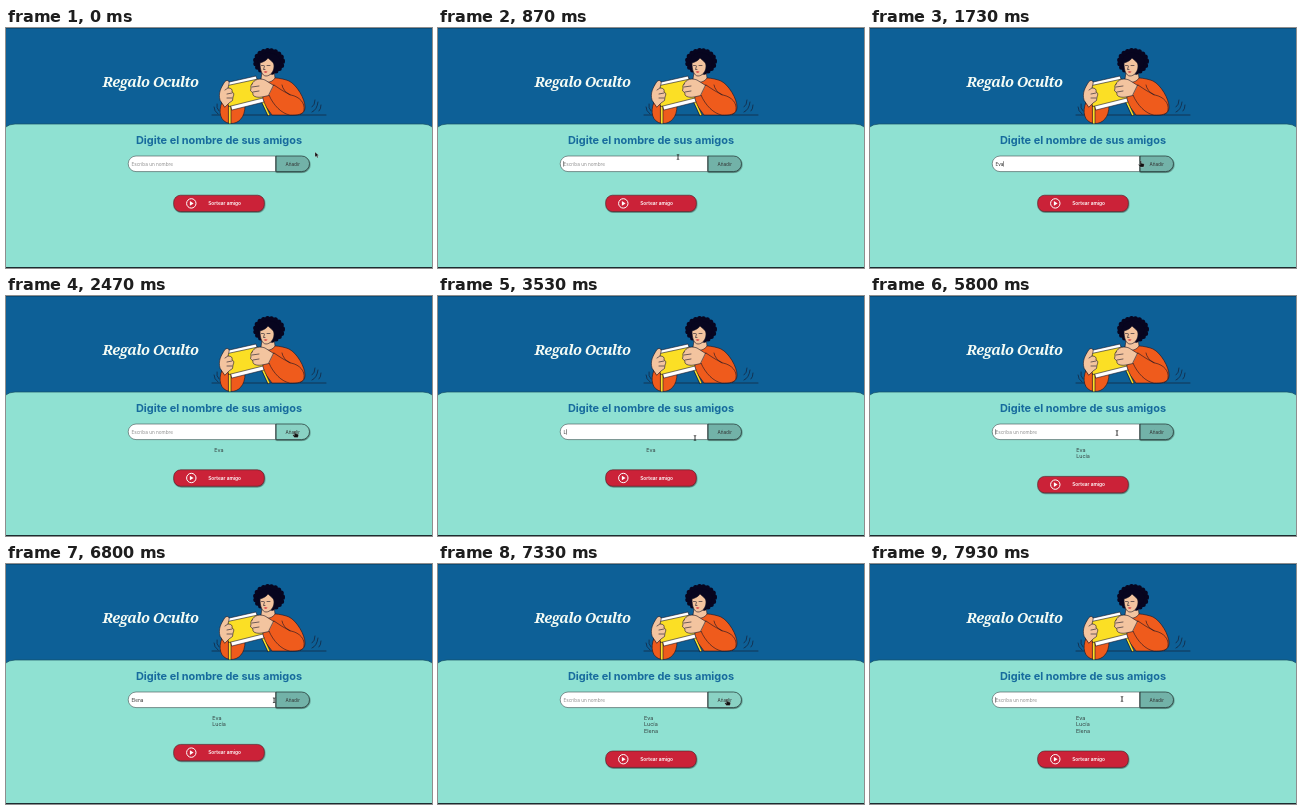
Recreate the animation shown at these times as an HTML page. Size 426 by 240 pixels, loop 8 s.

```html
<!DOCTYPE html>
<html lang="es">
<head>
<meta charset="utf-8">
<title>Regalo Oculto</title>
<style>
  html, body { margin: 0; width: 100%; height: 100%; overflow: hidden; background: #0d6097; }
  svg { display: block; width: 100vw; height: 100vh; }
  text { font-family: Inter, Roboto, sans-serif; }
  .title { font: italic 900 14.6px "Noto Serif", "Liberation Serif", serif; letter-spacing: -.6px; fill: #f4fbf4; }
  .heading { font-size: 10.95px; font-weight: 700; fill: #176b9d; }
  .field { font-size: 4.7px; fill: #333; }
  .list { font-size: 5.4px; fill: #333f3f; }
  .ink { stroke: #171525; stroke-width: .6; stroke-linejoin: round; stroke-linecap: round; }
  .line { fill: none; }
  .skin { fill: #f3c49f; }
  .orange { fill: #ef5b1c; }
  .yellow { fill: #fbdf25; }
</style>
</head>
<body>
<svg viewBox="0 0 426 240">
  <defs>
    <filter id="shadow" x="-10%" y="-20%" width="120%" height="160%">
      <feDropShadow dx=".5" dy="1" stdDeviation=".7" flood-opacity=".45"/>
    </filter>
  </defs>

  <rect width="426" height="240" fill="#0d6097"/>
  <rect width="426" height=".8" opacity=".25"/>
  <text class="title" x="144.5" y="59" text-anchor="middle">Regalo Oculto</text>

  <g class="ink">
    <path class="line" d="M206 87H320M208 79q0 4 4 7M211 76q-1 4 2 7M306 84q5-2 6-10M306 79q3-2 3-7M313 83q2-2 2-6"/>
    <path class="orange" d="M252 52C262 48 276 50 283 53C291 57 299 71 299 79C299 85 295 87 288 87H266L255 72Z"/>
    <path class="orange" d="M216 74C212 84 214 94 224 95.5C233 96 239 89 239 78Z"/>

    <path class="skin" d="M256 44L255 51C258 56 266 55 269 50L268 42Z"/>
    <g fill="#07051f" stroke="#07051f">
      <ellipse cx="263" cy="33.5" rx="13.5" ry="11" stroke="none"/>
      <ellipse cx="263" cy="33.5" rx="13.5" ry="11" fill="none" stroke-width="5" stroke-dasharray="0 4"/>
    </g>
    <path class="skin" d="M254 35C257 34 260 33 262 30C265 33 268 34 268 38C268 44 264 48 260 48C256 48 254 42 254 35Z"/>
    <path class="line" d="M255.5 37.5h2M261 37.5h3M258.5 38l-1 3.5h1.5"/>
    <path d="M257.6 43.8q2-1 4 0q-2 2-4 0" fill="#cf3039" stroke="none"/>

    <path class="yellow" d="M222.8 77h2.2V96h-2.2ZM254 70l1.8-.8L264 87l-1.8.7Z"/>
    <path fill="#fff" d="M219 55L250 48L258 74L226 82Z"/>
    <path class="yellow" d="M217 58.5L252 51L257 70L223 78.5Z"/>
    <path class="skin" d="M214 72C212 65 215 60 218 55C220 51 224 52 223 56L222 60Q227 60 226 64Q229 65 227 69Q228 73 223 75L219 79Z"/>
    <path class="line" d="M222 60l-3 2M226 65l-5 1M226 70l-5 0"/>
    <path class="skin" d="M246 56C248 51 254 50 259 52L270 59L265 67L256 69C250 70 246 68 247 65Q243 63 245 60Q244 58 246 56Z"/>
    <path class="line" d="M246 59l7-1M247 64l6-1"/>
    <path class="orange" d="M268 57C274 61 278 64 285 67C294 69 299 75 298 82C297 87 291 87 284 87C276 86 267 77 263 67Z"/>
    <path class="line" d="M276 57q1 6 8 10"/>
  </g>

  <path d="M-1 241V99.5Q3 96 9 96H417Q423 96 427 99.5V241Z" fill="#8fe1d2" stroke="#164f63" stroke-width=".7"/>
  <rect y="239" width="426" height="1" fill="#1d2c30"/>
  <text class="heading" x="213" y="116.2" text-anchor="middle">Digite el nombre de sus amigos</text>

  <g stroke="#20302f" stroke-width=".7">
    <path id="add" filter="url(#shadow)" d="M269.8 128H295.7a7.8 7.8 0 0 1 0 15.6H269.8Z"/>
    <path fill="#fff" stroke="#566" d="M269.8 128H130a7.8 7.8 0 0 0 0 15.6H269.8Z"/>
    <path d="M269.8 128v15.6"/>
  </g>
  <text class="field" x="286.7" y="137.5" text-anchor="middle">Añadir</text>
  <text class="field" id="hint" x="125.4" y="137.5" style="fill:#8d8d8d">Escriba un nombre</text>
  <text class="field" id="typed" x="125.4" y="137.5"></text>
  <rect id="caret" y="133.2" width=".5" height="5.4" fill="#222"/>
  <g id="list"></g>

  <g id="draw">
    <rect x="167.7" y="167.2" width="90.6" height="16.4" rx="7" fill="#cb2438" stroke="#4a1b26" stroke-width=".6" filter="url(#shadow)"/>
    <circle cx="185.3" cy="175.4" r="4.7" fill="none" stroke="#fff" stroke-width="1"/>
    <path d="M183.9 173.1L187.6 175.4L183.9 177.7Z" fill="#fff"/>
    <text x="218.6" y="177.1" text-anchor="middle" font-size="4.8" font-weight="600" fill="#fff">Sortear amigo</text>
  </g>

  <g id="pointer" stroke-linejoin="round">
    <path id="arrow" d="M0 0V5L1.3 3.9L2.2 5.8L3.1 5.4L2.3 3.6H3.8Z" fill="#111" stroke="#ddd" stroke-width=".3"/>
    <path id="hand" d="M-.7 0Q0-.8.6 0V2.1L3 2.7Q3.7 3 3.5 4L2.9 6H-.6L-2.3 3.7Q-2.1 2.8-1.4 3.2L-.7 3.9Z" fill="#111" stroke="#ddd" stroke-width=".25"/>
    <path id="beam" d="M-1.2-2.4Q0-2.4 0-1.8Q0-2.4 1.2-2.4M0-1.8V1.8M-1.2 2.4Q0 2.4 0 1.8Q0 2.4 1.2 2.4" fill="none" stroke="#111" stroke-width=".8"/>
  </g>
</svg>
<script>
const LOOP = 8000, BLINK = 540, TRAVEL = 400, ROW = 6.6;
const START = { x: 309, y: 124 }, BUTTON = { x: 289, y: 135.5 };
// Each round: reach the field, type from first to last key, leave, add.
const ROUNDS = [
  { name: "Eva", x: 240, y: 129, focus: 600, first: 930, last: 1400, leave: 1480, add: 2130 },
  { name: "Lucía", x: 257, y: 142, focus: 3000, first: 3530, last: 4400, leave: 4530, add: 5300 },
  { name: "Elena", x: 247, y: 137, focus: 5730, first: 5870, last: 6200, leave: 6600, add: 7270 },
  { name: "", x: 252, y: 135, focus: 7800, first: LOOP, last: LOOP, leave: LOOP, add: LOOP }
];

const $ = id => document.getElementById(id);
const show = (el, on) => el.setAttribute("visibility", on ? "visible" : "hidden");
const clamp = v => Math.min(1, Math.max(0, v));
const mix = (a, b, k) => a + (b - a) * k;

const rows = ROUNDS.map(({ name }, i) => {
  const row = document.createElementNS("http://www.w3.org/2000/svg", "text");
  row.setAttribute("class", "list");
  row.setAttribute("y", 155.5 + i * ROW);
  row.textContent = name;
  $("list").append(row);
  return row;
});

function drawForm(t, round, count) {
  const { name, focus, first, last } = round;
  const gap = (last - first) / Math.max(1, name.length - 1);
  const typed = t < first ? 0 : Math.min(name.length, 1 + Math.floor((t - first) / gap));
  const touched = typed ? first + (typed - 1) * gap : focus;
  $("typed").textContent = name.slice(0, typed);
  show($("hint"), !typed);
  show($("caret"), t >= focus && (t - touched) % (2 * BLINK) < BLINK);
  $("caret").setAttribute("x", 125.4 + (typed ? $("typed").getComputedTextLength() : 0));

  const width = Math.max(0, ...rows.slice(0, count).map(r => r.getComputedTextLength()));
  rows.forEach((row, i) => {
    show(row, i < count);
    row.setAttribute("x", 213 - width / 2);
  });
  $("draw").setAttribute("transform", `translate(0 ${count * ROW})`);
}

function drawPointer(t, round, count) {
  const leaving = t >= round.leave;
  const from = leaving ? round : count ? BUTTON : START;
  const to = leaving ? BUTTON : round;
  const begin = leaving ? round.leave : round.focus - TRAVEL;
  const k = clamp((t - begin) / TRAVEL);
  const x = mix(from.x, to.x, k), y = mix(from.y, to.y, k);

  const inside = x > 122 && x < 304 && y > 128 && y < 144;
  const kind = !inside ? "arrow" : x > 270 ? "hand" : "beam";
  for (const id of ["arrow", "hand", "beam"]) show($(id), id === kind);
  $("pointer").setAttribute("transform", `translate(${x} ${y})`);

  const glow = inside ? clamp((x - 270) / 16) : 0;
  $("add").setAttribute("fill", `rgb(${114 + 24 * glow},${178 + 32 * glow},${168 + 28 * glow})`);
}

const start = performance.now();
function frame() {
  const t = (performance.now() - start) % LOOP;
  const count = ROUNDS.filter(r => r.add <= t).length;
  drawForm(t, ROUNDS[count], count);
  drawPointer(t, ROUNDS[count], count);
  requestAnimationFrame(frame);
}
frame();
</script>
</body>
</html>
```
